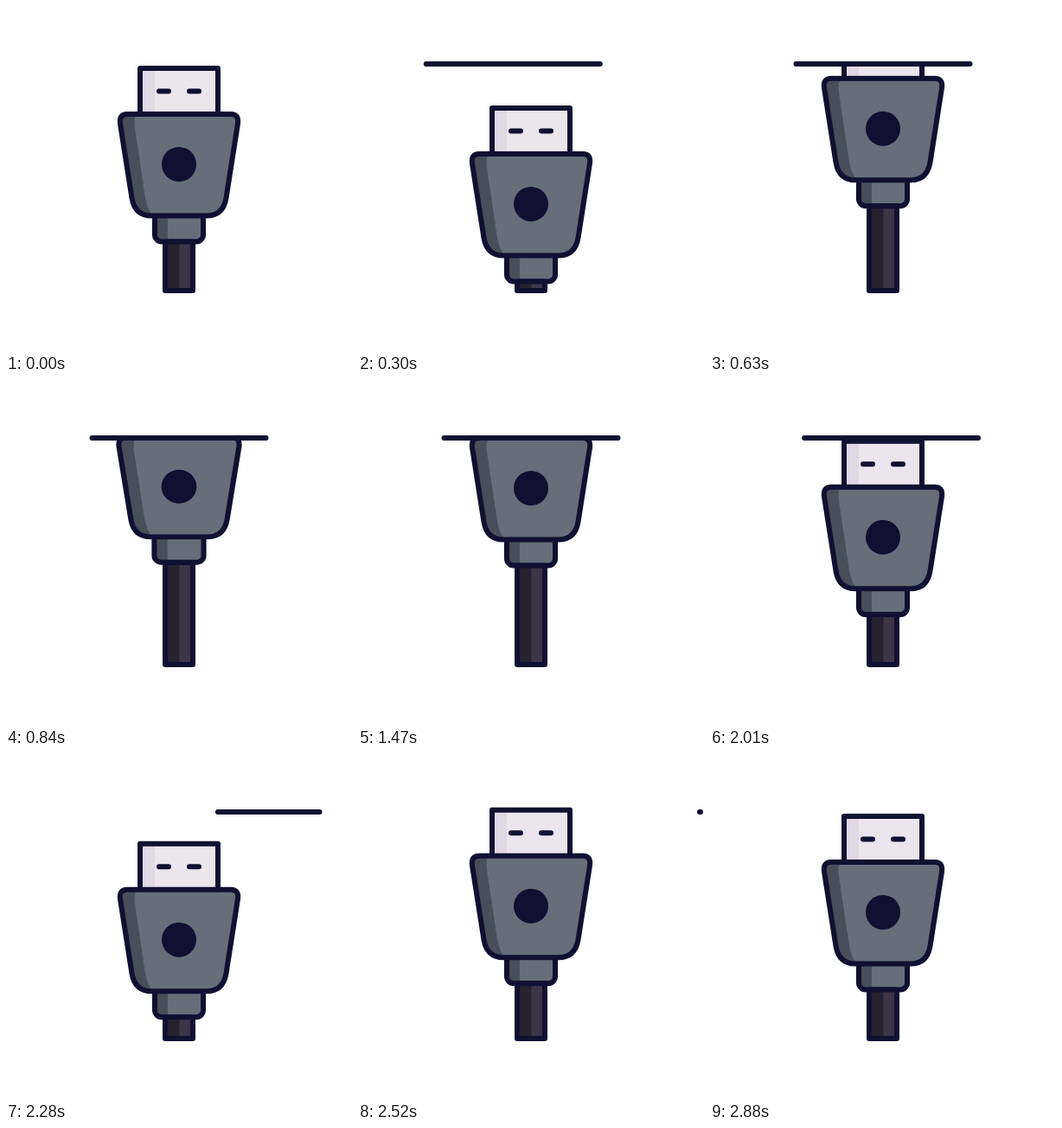
Write an HTML page with a canvas that moves like this. It is 400 px wide and 400 px high and loops after 5.09 s.

```html
<!DOCTYPE html>
<html lang="en">
<head>
<meta charset="utf-8">
<title>Plug</title>
<style>
html, body { margin: 0; width: 100%; height: 100%; overflow: hidden; background: #fff; }
canvas { display: block; width: 100vw; height: 100vh; }
</style>
</head>
<body>
<canvas id="stage"></canvas>
<script>
const LOOP = 5090;
const INK = '#101032';
const COLORS = {
  shell: '#656e79', shellDark: '#464f5a',
  metal: '#ebe5ee', metalDark: '#e1d8e5',
  cord: '#3d3548', cordDark: '#26222f'
};
const SLOT_Y = 67;
const canvas = document.getElementById('stage');
const ctx = canvas.getContext('2d');

// [time, offset] of the plug
const PLUG_KEYS = [
  [0, 0], [350, 48.5], [365, 48.5], [730, -61], [880, -58],
  [1820, -58], [2170, 42], [2550, -8], [2860, 0]
];

const clamp = p => Math.min(1, Math.max(0, p));
const ease = (t, a, b) => {
  const p = clamp((t - a) / (b - a));
  return p * p * (3 - 2 * p);
};
const bump = (t, a, b) => Math.sin(Math.PI * clamp((t - a) / (b - a)));

function track(keys, t) {
  let v = keys[0][1];
  for (let i = 1; i < keys.length; i++) {
    v += (keys[i][1] - keys[i - 1][1]) * ease(t, keys[i - 1][0], keys[i][0]);
  }
  return v;
}

function stroke(path) {
  ctx.strokeStyle = INK;
  ctx.lineWidth = 6;
  ctx.lineCap = ctx.lineJoin = 'round';
  ctx.stroke(path);
}

function segment(x1, x2, y) {
  const path = new Path2D();
  path.moveTo(x1, y);
  path.lineTo(x2, y);
  stroke(path);
}

// Fills a shape, darkens its left part and outlines it
function part(path, fill, dark, shade) {
  ctx.fillStyle = fill;
  ctx.fill(path);
  ctx.save();
  ctx.clip(path);
  ctx.fillStyle = dark;
  ctx.fill(shade);
  ctx.restore();
  stroke(path);
}

function box(x, y, w, h, radii = 0) {
  const path = new Path2D();
  path.roundRect(x, y, w, h, radii);
  return path;
}

const shell = new Path2D(
  'M140 125H260Q269.500 125 268 136L254.500 222Q251 242.500 232 242.500H168Q149 242.500 145.500 222L132 136Q130.500 125 140 125Z');
const shellShade = new Path2D(
  'M120 120H154Q147 127 149 141L161 222Q163.500 237 173 246H120Z');

function drawPlug(y, squash) {
  ctx.save();
  ctx.translate(200, 125 + y);
  ctx.scale(1 + 0.02 * squash, 1 - 0.022 * squash);
  ctx.translate(-200, -125);

  part(box(155, 72, 90, 53.5), COLORS.metal, COLORS.metalDark, box(155, 71, 17, 55));
  segment(177, 188, 98.5);
  segment(212, 223, 98.5);

  part(box(172, 242, 56, 30.5, [0, 0, 8, 8]), COLORS.shell, COLORS.shellDark,
    box(172, 242, 15, 31));
  part(shell, COLORS.shell, COLORS.shellDark, shellShade);

  ctx.fillStyle = INK;
  ctx.beginPath();
  ctx.arc(200, 183, 20, 0, Math.PI * 2);
  ctx.fill();
  ctx.restore();
}

function drawCord(top) {
  const h = 329 - top;
  part(box(184, top, 32, h), COLORS.cord, COLORS.cordDark, box(184, top, 16.5, h));
}

function drawSlot(t) {
  if (t < 20 || t >= 2530) return;
  const shift = -96 * (1 - ease(t, 0, 430)) + 96 * ease(t, 1880, 2550);
  const from = 201 * ease(t, 2075, 2540);
  const to = 201 * ease(t, -20, 300);
  segment(99.5 + shift + from, 99.5 + shift + to, SLOT_Y);
}

function draw(t) {
  const scale = Math.min(innerWidth, innerHeight) / 400;
  const ratio = scale * (window.devicePixelRatio || 1);
  const size = Math.round(400 * ratio);
  if (canvas.width !== size) {
    canvas.width = canvas.height = size;
    canvas.style.width = canvas.style.height = 400 * scale + 'px';
  }
  ctx.setTransform(ratio, 0, 0, ratio, 0, 0);
  ctx.fillStyle = '#fff';
  ctx.fillRect(0, 0, 400, 400);

  const y = track(PLUG_KEYS, t);
  const squash = bump(t, 680, 1020) + bump(t, 2530, 2860);
  ctx.save();
  if (t > 300 && t < 2200) {
    ctx.beginPath();
    ctx.rect(0, SLOT_Y, 400, 400 - SLOT_Y);
    ctx.clip();
  }
  drawPlug(y, squash);
  drawCord(272.5 + y - 3 * squash - 4 * bump(t, 1640, 1960));
  ctx.restore();
  drawSlot(t);
}

function frame() {
  draw(performance.now() % LOOP);
  requestAnimationFrame(frame);
}
frame();
</script>
</body>
</html>
```
